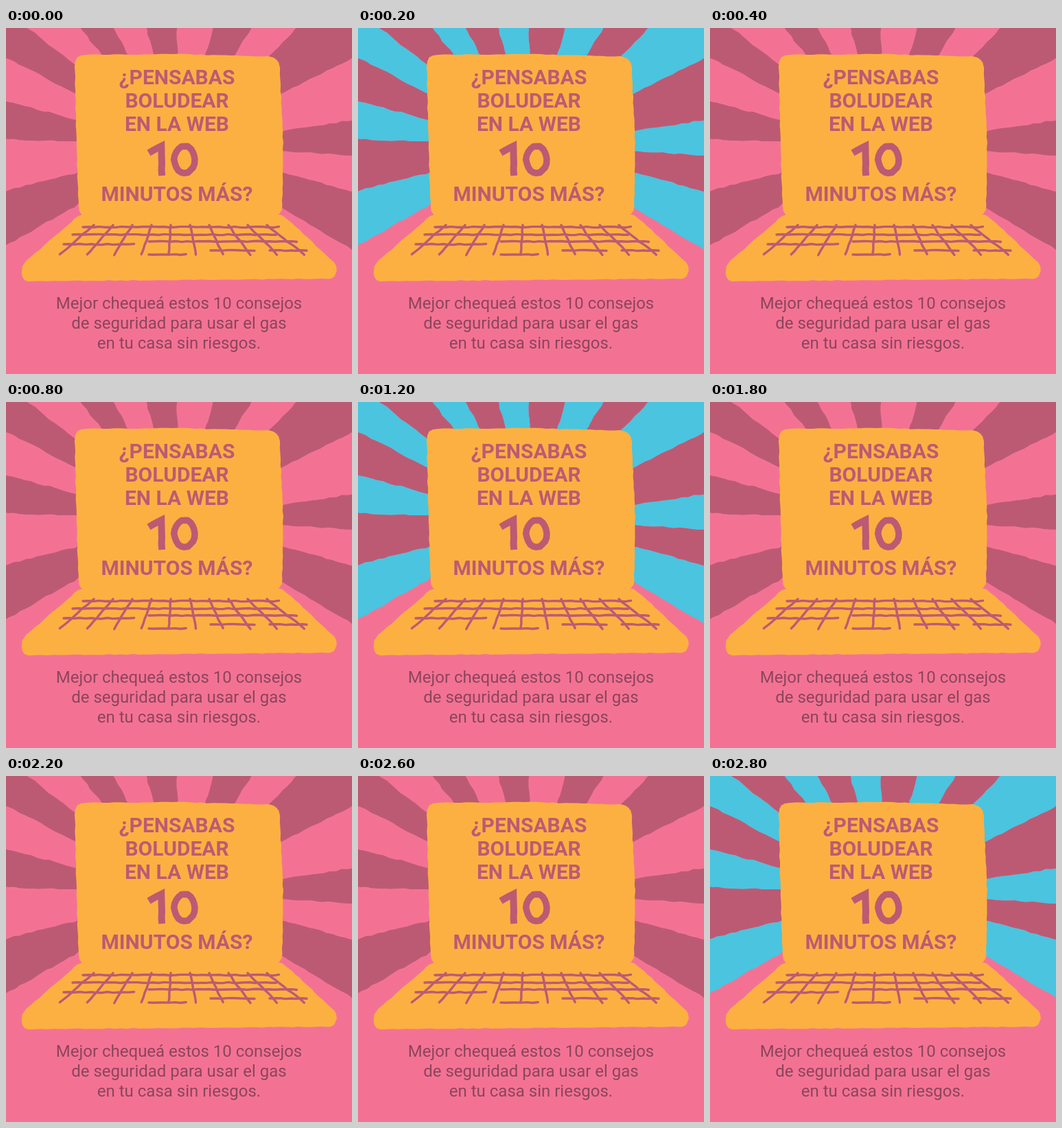
Animation of 504x504 px, one loop 3 s. Source, as an HTML page with a canvas:

```html
<!DOCTYPE html>
<html lang="es">
<head>
<meta charset="utf-8">
<style>
  html, body { margin: 0; width: 100%; height: 100%; overflow: hidden; background: #f37294; }
  canvas { display: block; }
</style>
</head>
<body>
<canvas id="stage" width="504" height="504"></canvas>
<script>
const ctx = document.getElementById('stage').getContext('2d');
const PINK = '#f37294', DARK = '#bc5a74', ORANGE = '#fcb042', BLUE = '#4bc4df', TEXT = '#8c455b';
const LOOP = 3000, STEP = 200;

let seed = 7;
const jitter = size => {
  seed = (seed * 16807) % 2147483647;
  return (seed / 2147483647 - 0.5) * 2 * size;
};

const mix = ([ax, ay], [bx, by], t) => [ax + (bx - ax) * t, ay + (by - ay) * t];
const distance = ([ax, ay], [bx, by]) => Math.hypot(bx - ax, by - ay);

// Splits a polyline into short, slightly uneven pieces.
function rough(points, size = 0.6, step = 9) {
  const result = [points[0]];
  for (let i = 1; i < points.length; i++) {
    const count = Math.ceil(distance(points[i - 1], points[i]) / step);
    for (let j = 1; j <= count; j++) {
      const [x, y] = mix(points[i - 1], points[i], j / count);
      result.push([x + jitter(size), y + jitter(size)]);
    }
  }
  return result;
}

function toPath(points, closed = true) {
  const path = new Path2D();
  points.forEach(([x, y]) => path.lineTo(x, y));
  if (closed) path.closePath();
  return path;
}

function roundedShape(corners, radius) {
  const outline = corners.flatMap((corner, i) => {
    const toward = other => mix(corner, other, radius / distance(corner, other));
    const start = toward(corners.at(i - 1));
    const end = toward(corners[(i + 1) % corners.length]);
    return [0, 0.25, 0.5, 0.75, 1].map(t => mix(mix(start, corner, t), mix(corner, end, t), t));
  });
  return toPath(rough([...outline, outline[0]]));
}

// Neighbouring sectors share one uneven edge, so they leave no seams.
const edges = [-31, -14.5, -3, 8.6, 27, 45, 58.5, 74, 91, 105.5, 119, 130, 142, 153, 165.5, 177.7, 194.5, 210]
  .map(degrees => {
    const angle = degrees * Math.PI / 180;
    const at = radius => [252 + radius * Math.cos(angle), 172 - radius * Math.sin(angle)];
    return rough([at(60), at(420)], 1.1);
  });
const sectors = edges.slice(1).map((edge, i) => toPath([...edges[i], ...edge.toReversed()]));

const screen = roundedShape([[100, 39], [250, 38], [398, 42], [404, 175], [402, 275], [106, 275], [102, 150]], 16);
const base = roundedShape([[108, 271], [402, 271], [483, 346], [480, 365], [24, 369], [22, 346]], 10);

const keyRows = [
  [112, 397, 290], [97, 394, 301], [84, 187, 315], [208, 424, 311],
  [208, 262, 330], [298, 362, 324], [384, 438, 324]
].map(([left, right, y]) => [[left, y], [right, y]]);
const keyColumns = Array.from({ length: 10 }, (_, i) => [[128 + 28 * i, 287], [79 + 39.5 * i, 330]]);
const keyLines = [...keyRows, ...keyColumns].map(line => toPath(rough(line, 0.7, 8), false));

const digitOne = toPath(rough([[208, 182], [226, 172], [227, 215]], 0.4), false);
const digitZero = toPath(rough(Array.from({ length: 20 }, (_, i) => {
  const angle = i * Math.PI / 10;
  return [260 + 15 * Math.cos(angle), 191.5 + 19.5 * Math.sin(angle)];
}), 0.5));

function fill(path, color) {
  ctx.fillStyle = color;
  ctx.fill(path);
}

function stroke(path, width, cap) {
  ctx.strokeStyle = DARK;
  ctx.lineWidth = width;
  ctx.lineCap = cap;
  ctx.stroke(path);
}

function write(lines, font, color, x, y, leading) {
  ctx.font = font;
  ctx.fillStyle = color;
  lines.forEach((line, i) => ctx.fillText(line, x, y + i * leading));
}

// The blue beat is held for two steps in the middle of the loop.
function isBlue(time) {
  const step = Math.floor(time % LOOP / STEP);
  return step < 7 ? step % 2 === 1 || step === 6 : step % 2 === 0;
}

function draw(time) {
  const [rayColor, gapColor] = isBlue(time) ? [BLUE, DARK] : [DARK, PINK];
  ctx.fillStyle = PINK;
  ctx.fillRect(0, 0, 504, 504);
  sectors.forEach((sector, i) => fill(sector, i % 2 ? gapColor : rayColor));

  fill(screen, ORANGE);
  fill(base, ORANGE);
  keyLines.forEach(line => stroke(line, 3.4, 'round'));
  stroke(digitOne, 10, 'butt');
  stroke(digitZero, 9.5, 'butt');

  ctx.textAlign = 'center';
  const title = 'bold 30px Roboto, sans-serif';
  write(['¿PENSABAS', 'BOLUDEAR', 'EN LA WEB'], title, DARK, 249, 82, 34);
  write(['MINUTOS MÁS?'], title, DARK, 249, 252, 0);
  write(['Mejor chequeá estos 10 consejos', 'de seguridad para usar el gas', 'en tu casa sin riesgos.'],
    '24px Roboto, sans-serif', TEXT, 252, 409, 29);
}

function tick() {
  draw(performance.now());
  requestAnimationFrame(tick);
}
tick();
</script>
</body>
</html>
```
